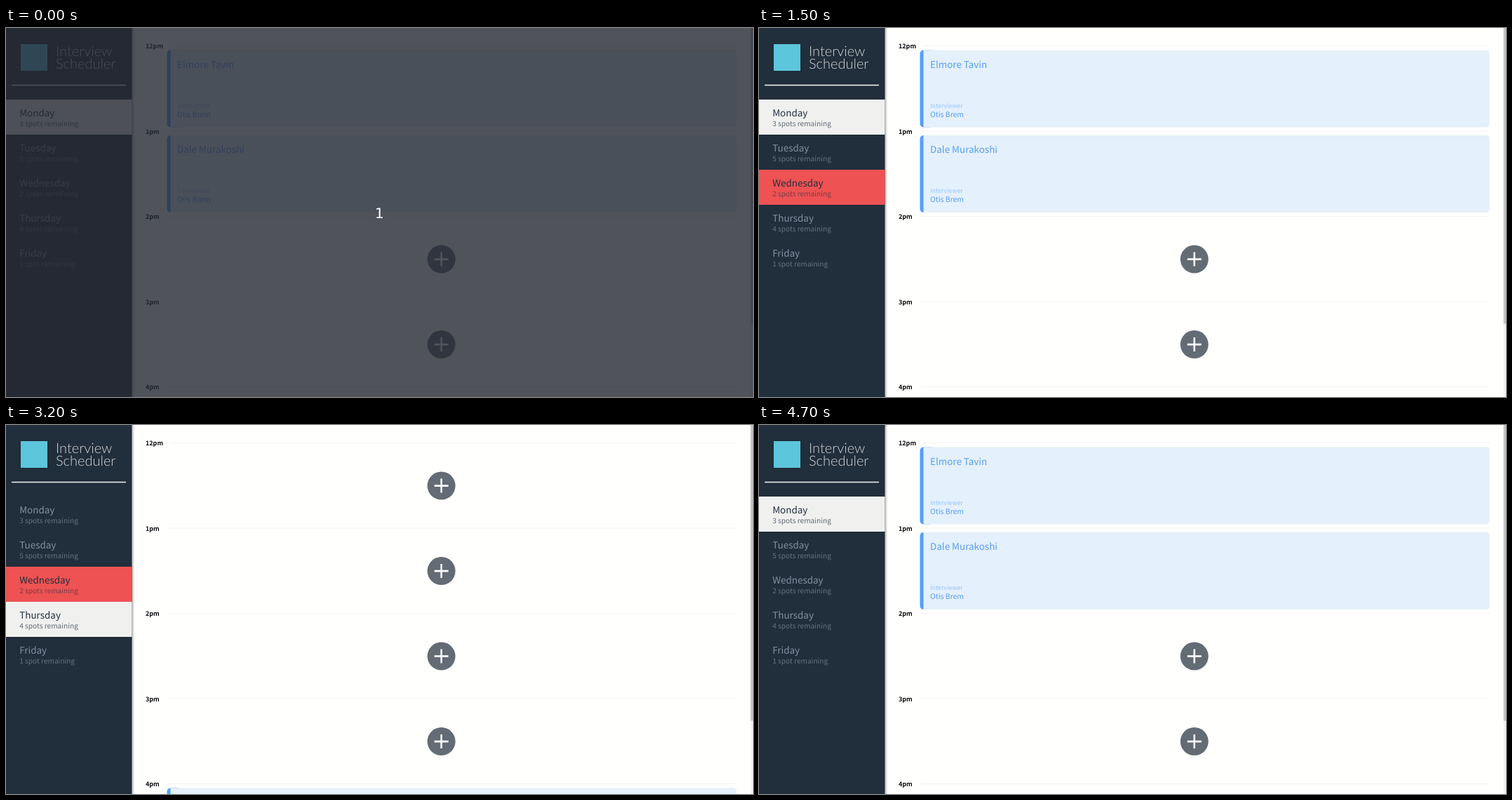
An HTML page for the animation above (6.6 s loop, 1065 px wide and 526 px high).

```html
<!DOCTYPE html>
<html lang="en">
<head>
<meta charset="utf-8">
<title>Interview Scheduler</title>
<style>
  html, body { margin: 0; width: 100%; height: 100%; overflow: hidden; background: #fffffd; }
  svg { display: block; width: 1065px; height: 526px; }
  text {
    font-family: "Noto Sans CJK JP", "Noto Sans CJK SC", "Noto Sans CJK", "Noto Sans", sans-serif;
    text-rendering: geometricPrecision;
  }
  .brand { font: 300 20px Lato, "Open Sans", sans-serif; fill: #d3d7da; }
  .time { font-size: 9px; font-weight: 700; fill: #0c0d10; }
  .student { font-size: 13.45px; fill: #559ff8; }
  .label { font-size: 8.75px; fill: #98c4f9; }
  .person { font-size: 10.45px; fill: #559ff8; }
  .day rect { fill: none; }
  .day .name { font-size: 13.45px; fill: #8291a0; }
  .day .spots { font-size: 10.15px; fill: #65727f; }
  .day.selected rect { fill: #f0f0ef; }
  .day.hover rect { fill: #ee5253; }
  .day.selected .name, .day.hover .name { fill: #222f3e; }
  .day.selected .spots { fill: #626a74; }
  .day.hover .spots { fill: #793e47; }
  .count { font: 20px "DejaVu Sans", sans-serif; fill: #fff; text-anchor: middle; }
</style>
</head>
<body>
<svg id="stage" viewBox="0 0 1065 526">
  <defs>
    <linearGradient id="edge">
      <stop offset="0" stop-color="#000" stop-opacity=".3"/>
      <stop offset="1" stop-color="#000" stop-opacity="0"/>
    </linearGradient>
  </defs>
  <rect width="1065" height="526" fill="#fffffd"/>
  <g id="hours"></g>
  <g id="schedules"></g>
  <rect x="1061.5" width="3.5" height="526" fill="#f1f1f1"/>
  <rect x="1061.5" width="3.5" height="421.5" fill="#c3c3c3"/>
  <rect x="179" width="4.5" height="526" fill="url(#edge)"/>
  <rect width="179.5" height="526" fill="#212e3b"/>
  <rect x="21" y="23" width="38" height="38" fill="#5cc6dc"/>
  <text class="brand" x="71" y="40">Interview</text>
  <text class="brand" x="71" y="58">Scheduler</text>
  <path d="M8 81.5H171" stroke="#f4f5f5" stroke-width="1.3"/>
  <g id="days"></g>
  <g id="intro">
    <rect width="1065" height="526" fill="rgb(37,41,50)" fill-opacity=".8"/>
    <text class="count" x="532.3" y="270.5">1</text>
  </g>
</svg>
<script>
const LOOP = 6600, INTRO_END = 100, ROW = 121.5;

// Booked slots per day: hour index -> [student, interviewer]
const days = [
  { name: "Monday", spots: 3, booked: { 0: ["Elmore Tavin", "Otis Brem"], 1: ["Dale Murakoshi", "Otis Brem"] } },
  { name: "Tuesday", spots: 5, booked: {} },
  { name: "Wednesday", spots: 2, booked: { 1: ["Karim Bolden", "Nina Hadwell"], 3: ["Augustin Fellor", "Lars Dobel"], 4: [] } },
  { name: "Thursday", spots: 4, booked: { 4: [] } },
  { name: "Friday", spots: 1, booked: {
    0: ["Elise Tourval", "Lars Dobel"], 1: ["Gregory Lin-Casteran", "Lars Dobel"],
    3: ["Bernard Leng", "Nina Hadwell"], 4: [] } }
];

// [start ms, selected day, hovered day]
const steps = [
  [0, 0, -1], [1100, 0, 1], [1500, 0, 2], [1900, 0, 3], [2100, 0, 4],
  [2600, 4, -1], [2800, 4, 3], [2900, 3, -1], [3200, 3, 2], [3500, 2, -1],
  [3700, 2, 1], [4000, 1, -1], [4300, 1, 0], [4700, 0, -1]
];

const byId = id => document.getElementById(id);
const text = (cls, x, y, str) => `<text class="${cls}" x="${x}" y="${y}">${str}</text>`;

function card(y, [student, person]) {
  const box = `<rect x="229.5" y="${y}" width="20" height="110" rx="5" fill="#559ff8"/>
    <path d="M234.5 ${y}H1036.5q5 0 5 5v100q0 5-5 5H234.5z" fill="#e4f0fb"/>`;
  if (!student) return box;
  return box + text("student", 244, y + 25.1, student)
    + text("label", 244, y + 82, "Interviewer") + text("person", 244, y + 95.3, person);
}

function addButton(y) {
  return `<circle cx="620.7" cy="${y}" r="20" fill="#636b75"/>
    <path d="M610.7 ${y}h20m-10-10v20" stroke="#fff" stroke-width="2.6"/>`;
}

const hours = ["12pm", "1pm", "2pm", "3pm", "4pm"];
byId("hours").innerHTML = hours.map((hour, i) => {
  const y = 25.5 + i * ROW;
  return text("time", 199, y + 3.8, hour)
    + `<path d="M${i ? 229.5 : 234} ${y}H1041.5" stroke="#f3f3f3"/>`;
}).join("");

byId("schedules").innerHTML = days.map(({ booked }) =>
  "<g>" + hours.map((_, i) =>
    booked[i] ? card(31.5 + i * ROW, booked[i]) : addButton(86.6 + i * ROW)
  ).join("") + "</g>").join("");

byId("days").innerHTML = days.map(({ name, spots }, i) => {
  const y = 102 + i * 50;
  return `<g class="day"><rect y="${y}" width="179.5" height="50"/>`
    + text("name", 19.2, y + 23.5, name)
    + text("spots", 19.2, y + 38, `${spots} spot${spots > 1 ? "s" : ""} remaining`) + "</g>";
}).join("");

const items = [...byId("days").children];
const schedules = [...byId("schedules").children];
const show = (el, on) => el.setAttribute("visibility", on ? "visible" : "hidden");

function draw() {
  const t = performance.now() % LOOP;
  const [, selected, hovered] = steps.findLast(step => step[0] <= t);
  items.forEach((el, i) => {
    el.classList.toggle("selected", i === selected);
    el.classList.toggle("hover", i === hovered);
  });
  schedules.forEach((el, i) => show(el, i === selected));
  show(byId("intro"), t < INTRO_END);
  requestAnimationFrame(draw);
}
draw();
</script>
</body>
</html>
```
